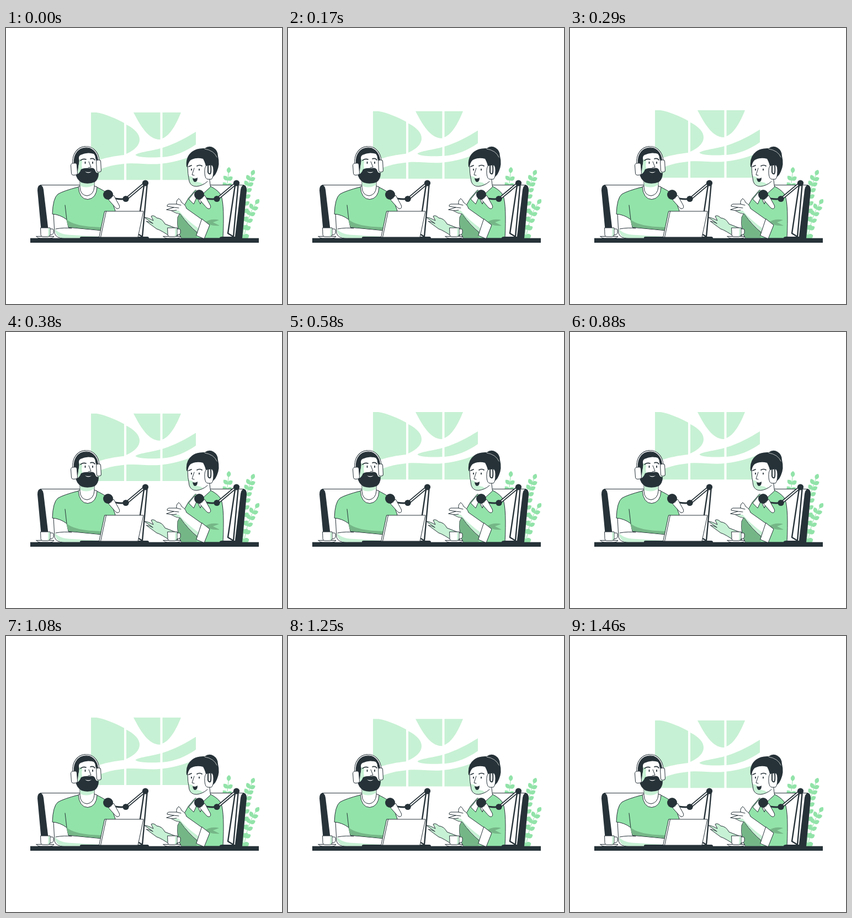
An HTML page that plays this animation: 500x500 px, repeating every 1.5 s.

```html
<!DOCTYPE html>
<html lang="en">
<head>
<meta charset="utf-8">
<title>Podcast</title>
<style>
html, body { margin: 0; width: 100%; height: 100%; overflow: hidden; background: #fff; }
svg { display: block; width: 100%; height: 100%; }
path, rect { stroke-linejoin: round; stroke-linecap: round; }
.dark { fill: #263238; }
.green { fill: #92e3a9; }
.light { fill: #c7f1d4; }
.shade { fill: #75b687; }
.white { fill: #fff; }
.line { stroke: #263238; stroke-width: 1; }
.open { fill: none; }
.bold { stroke-width: 1.7; }
.rod { fill: none; stroke: #263238; stroke-width: 2.4; }
.gap { fill: none; stroke: #fff; stroke-width: 1.8; }
</style>
</head>
<body>
<svg viewBox="0 0 500 500">
  <defs>
    <g id="chair">
      <path class="white" d="M64 284.5H150V381H70Z"/>
      <path class="line open" d="M62 284.500H150"/>
      <path class="dark" d="M57 294Q57 285 62 284.500Q67 285 68 293L78.500 381H65Z"/>
    </g>
    <g id="mic">
      <path class="dark" d="M222 381V379.500Q223 378 226 378H256Q259 378 259 381Z"/>
      <path class="white" d="M250 285L237 372L247 378L256 285Z"/>
      <path class="rod" d="M250 285L237 372L247 378L255.500 285"/>
      <path class="rod" d="M193 307Q200 311 218 309.500" style="stroke-width:3"/>
      <path class="rod" d="M218 309.500L252 281" style="stroke-width:5.500"/>
      <path class="gap" d="M221 307L249 283.500"/>
      <path class="white line" d="M186 311L195 303L205 321Q207 326 203 327.500Q200 328 197 324Z"/>
      <circle class="dark" cx="217" cy="309.500" r="5.600"/>
      <circle class="dark" cx="252.500" cy="281" r="5.600"/>
      <circle class="dark" cx="185" cy="302" r="9"/>
      <path class="gap" d="M187 311.500L195 304" style="stroke-width:.8"/>
    </g>
    <g id="cup">
      <path class="white line" d="M55 377.500H87Q85 381 80 381H62Q57 381 55 377.500Z"/>
      <path class="white line" d="M79 364H84Q86 364 86 367V371Q86 374.500 79 375"/>
      <path class="white line" d="M63 362H80V374Q80 378 76 378H67Q63 378 63 374Z"/>
      <path class="light" d="M76.500 363H79.500V374Q79 377 75 377.500Q77 375 76.500 371Z"/>
    </g>
  </defs>

  <g id="panel" class="light">
    <path d="M154 153H164C181 156 199 164 214 172V230C196 232 181 235 172 238L154 243Z"/>
    <path d="M218 175C250 191 250 214 218 228Z"/>
    <path d="M231 153H279.500V202C258 203 243 176 231 153Z"/>
    <path d="M283.500 153H317C309 173 298 194 283.500 200Z"/>
    <path d="M279.500 218V234C262 235 240 235 234.500 230C239 225 263 223 279.500 218Z"/>
    <path d="M283.500 217C306 210 326 199 344 188V211C325 224 306 232 283.500 234Z"/>
    <path d="M154 263C174 253 193 248 214 246V275.300H154Z"/>
    <path d="M218 245.500C239 244 260 248 279.500 246V275.300H218Z"/>
    <path d="M283.500 245.500C306 243 326 237 344 229V275.300H283.500Z"/>
  </g>

  <g id="plants"></g>
  <use href="#chair"/>
  <use href="#chair" transform="matrix(-1 0 0 1 493 0)"/>

  <g id="guest">
    <path class="green line" d="M343 294L371 287Q386 295 390 304Q396 323 393 381H318Q309 368 311 343L330 309Z"/>
    <path class="shade" d="M311.500 343L322 331L357 350L345 377L346 380.500H318Q310 365 311.500 343ZM359 352Q374 344 386 348L375 352L387 358Q377 359 368 356Z"/>
    <path class="light line" d="M251 343Q256 343 267 349L263 341Q267 338 273 344Q283 345 288 355L311 364V381H302Q281 366 273 364L254 350Q261 351 266 354Z"/>
    <path class="white line" d="M291 329L304 325L292 323Q291 320 295 319L309 319Q308 312 313 309Q317 312 318 316Q325 320 327 327L358 349L347 371Q329 356 316 337Q307 336 300 331Z"/>
    <path class="light" d="M302 331L313 331Q326 347 350 364L347 370Q329 355 316 336.500Q307 335 302 331Z"/>
    <path class="line open" d="M304 325L313 326M309 319L317 321M300 331L309 330"/>
    <path class="white line" d="M355 346L369 357L359 382L345 376Z"/>
    <path class="white" d="M346 281L368 268L370.500 288L353 304L344 300Z"/>
    <path class="line open" d="M368 268L370.500 288L355 302"/>
    <path class="white line" d="M341 298L331 310L340 319L346 306L352 319L357 304L346 297Z"/>
    <path class="dark" d="M327 251Q325 233 337 224Q346 217 360 218Q368 212 376 217Q384 222 384 232Q388 247 382 260Q378 270 369 273L354 270Z"/>
    <path class="white" d="M329 251Q331 240 337 238Q346 234 357 237Q362 246 363 256L367 276Q356 286 345 287Q335 287 332 278Q329 263 329 251Z"/>
    <path class="light" d="M331 268L338 270Q341 279 352 280L358 283Q350 287 345 286.500Q335 286 332 278Z"/>
    <path class="line open" d="M329 251Q329 263 332 278Q335 287 345 287Q356 286 365 278"/>
    <path class="line open bold" d="M331 251L336 249M346 250Q351 247 355 250"/>
    <path class="line open" d="M341 254L337 266L341 267"/>
    <ellipse class="dark" cx="336" cy="256.500" rx="1" ry="2"/>
    <ellipse class="dark" cx="350" cy="256.500" rx="1" ry="2"/>
    <path class="dark" d="M338 272Q343 274 347 271Q347 279 342 279Q339 278 338 272Z"/>
    <path class="gap" d="M360 219Q377 222 382 234" style="stroke-width:.7"/>
    <path class="white line" d="M364 249Q359 250 360 264Q361 274 366 274H372Q376 271 376 258Q376 249 372 248Z"/>
    <path class="rod" d="M366 249V261Q367 265 370 264Q372 262 371 249" style="stroke-width:2"/>
  </g>

  <g id="host">
    <path class="white line" d="M86 335L88 372Q91 381 105 381H172V365L113 360L112 340Z"/>
    <path class="light" d="M88.500 364Q98 375 120 375L171 378V380.500H104Q90 380 88.500 364Z"/>
    <path class="line open" d="M111 346L113 361L170 366M90 364Q106 361 119 363"/>
    <path class="green line" d="M131 288Q104 295 94 301Q85 308 84 337Q98 338 110 347L113 361L174 367L198 331Q190 308 184 300Q177 294 164 288Z"/>
    <path class="shade" d="M108.500 345Q120 360 175 361L173 366.500L113 360.500Z"/>
    <path class="line open" d="M110 347L107 321"/>
    <path class="white line" d="M131 288Q133 310 148 310.500Q164 309 165 288L159 286H135Z"/>
    <path class="white line" d="M134 272V289Q135 303 147 304Q159 302 160 288V272Z"/>
    <path class="light" d="M134.500 278H159.500V284Q147 292 134.500 286Z"/>
    <path class="dark" d="M121 248Q119 228 130 221Q147 213 161 222Q168 231 167 244L164 259H126Z"/>
    <path class="white" d="M131 252L133 241Q130 233 135 230Q147 224 159 228Q162 231 162 236L165 244V266L146 274L129 268Z"/>
    <path class="light" d="M133 238Q138 237 138 243Q136 249 139 256L134 267L130 262Z"/>
    <path class="dark" d="M126 263Q131 268 136 256Q142 253 151 254Q160 252 162 259Q164 264 168 262Q168 274 161 279Q149 284 137 280Q127 274 126 263Z"/>
    <path class="white" d="M143 260Q149 262.500 155 260Q149 265 143 260Z"/>
    <path class="line open bold" d="M135 240Q139 236 145 238M153 237Q158 235 161 239"/>
    <path class="line open" d="M150 242L154 252L149 253"/>
    <ellipse class="dark" cx="143.500" cy="244" rx="1" ry="2.200"/>
    <ellipse class="dark" cx="157" cy="244" rx="1" ry="2.200"/>
    <path class="rod" d="M122 246C119 209 165 204 168 241" style="stroke-width:3.400"/>
    <path class="gap" d="M122 246C119 209 165 204 168 241" style="stroke-width:1.500"/>
    <rect class="white line" x="118" y="245" width="11" height="21.500" rx="4" transform="rotate(-4 123 256)"/>
    <rect class="white line" x="164" y="239" width="8" height="22" rx="3.500" transform="rotate(-3 168 250)"/>
  </g>

  <use href="#mic"/>
  <use href="#mic" x="165"/>
  <path class="dark" d="M134 381V379Q135 378 137 378H239V381Z"/>
  <path class="white line" d="M179 332H249L239 379H169Z"/>
  <path class="line open" d="M181.500 332L171.500 379"/>
  <use href="#cup"/>
  <use href="#cup" x="230"/>
  <rect class="dark" x="44" y="380.700" width="414" height="8.300"/>
</svg>
<script>
const lerp = (a, b, t) => a + (b - a) * t;

// Leaf pairs along a quadratic stem, with a single leaf at the tip.
function sprig([x0, y0], [cx, cy], [x1, y1], pairs) {
  let markup = `<path d="M${x0} ${y0}Q${cx} ${cy} ${x1} ${y1}" fill="none" stroke="#92e3a9"/>`;
  const leaf = (x, y, angle) => {
    markup += `<path class="green" d="M0 0C3-5 8-5 11 0C8 5 3 5 0 0Z" transform="translate(${x} ${y}) rotate(${angle})"/>`;
  };
  for (let i = 0; i <= pairs; i++) {
    const t = i / pairs;
    const dx = lerp(cx - x0, x1 - cx, t), dy = lerp(cy - y0, y1 - cy, t);
    const x = lerp(lerp(x0, cx, t), lerp(cx, x1, t), t);
    const y = lerp(lerp(y0, cy, t), lerp(cy, y1, t), t);
    const angle = Math.atan2(dy, dx) * 180 / Math.PI;
    const spreads = i < pairs ? [-48, 48] : [0];
    spreads.forEach(spread => leaf(x, y, angle + spread));
  }
  return markup;
}

document.getElementById("plants").innerHTML =
  sprig([398, 310], [400, 290], [403, 263], 4) +
  sprig([430, 381], [428, 305], [445, 267], 9) +
  sprig([431, 381], [437, 340], [452, 319], 5);

const panel = document.getElementById("panel");
const period = 1500, peak = 730, rise = 10;

// Rises and falls at constant speed, then rests until the loop ends.
function draw(now) {
  const lift = rise * Math.max(0, 1 - Math.abs(now % period / peak - 1));
  panel.setAttribute("transform", `translate(0 ${-lift})`);
  requestAnimationFrame(draw);
}
draw(performance.now());
</script>
</body>
</html>
```
